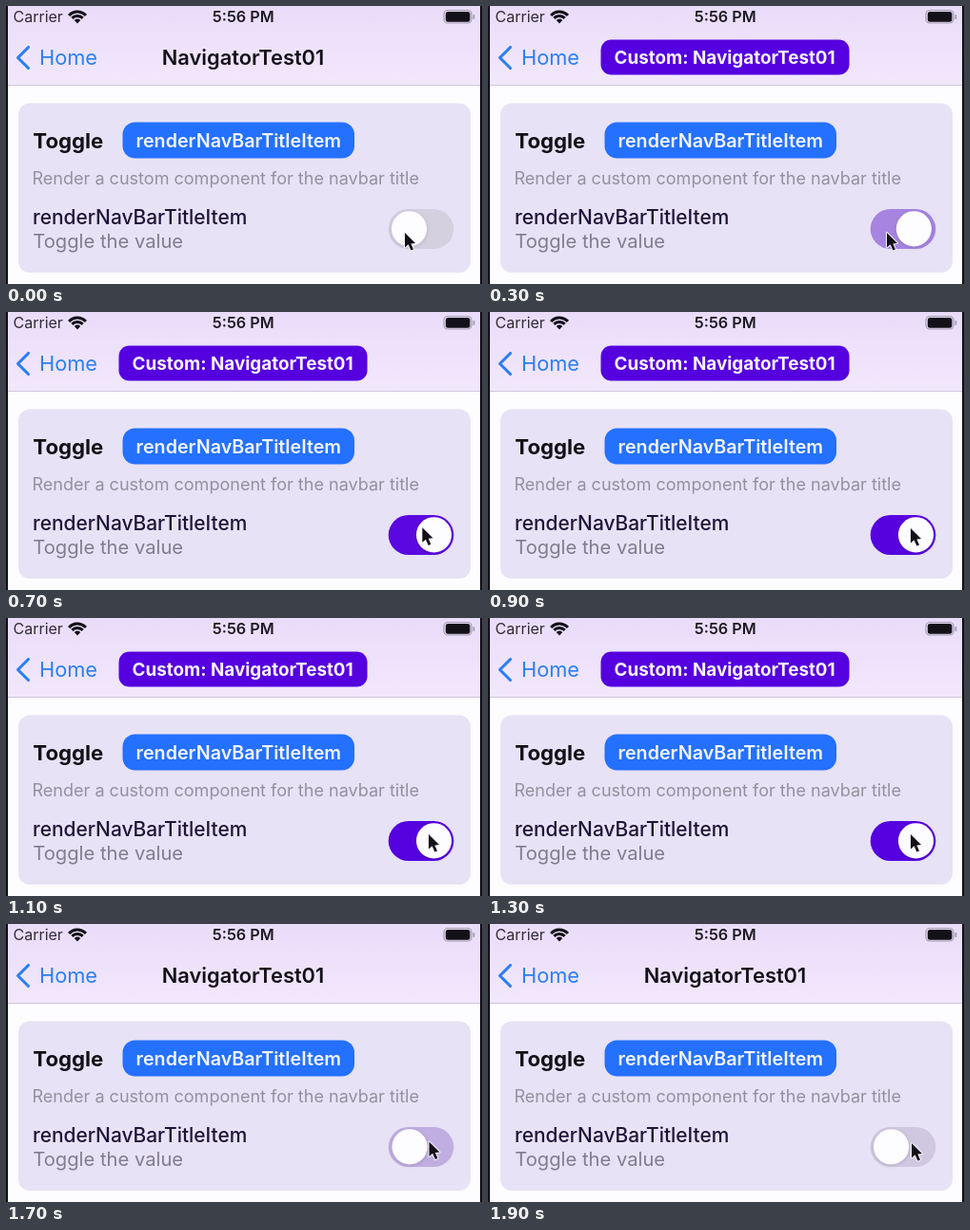
These frames come from a looping animation (500 by 293 pixels, 2000 ms). An HTML page with a canvas:

```html
<!DOCTYPE html>
<html lang="en">
<head>
<meta charset="utf-8">
<title>Navbar title toggle</title>
<style>
html, body { margin: 0; width: 100%; height: 100%; overflow: hidden; background: #fdfcff; }
canvas { display: block; width: 500px; height: 293px; }
</style>
</head>
<body>
<canvas id="stage"></canvas>
<script>
const W = 500, H = 293, LOOP = 2000, STEP = 100;
const INK = '#131018', BLUE = '#2a7ff3', VIOLET = '#5500df';
const canvas = document.getElementById('stage');
const ctx = canvas.getContext('2d');
const ratio = window.devicePixelRatio || 1;
canvas.width = W * ratio;
canvas.height = H * ratio;
ctx.scale(ratio, ratio);

const mix = (a, b, p) => a + (b - a) * p;
const ramp = (t, from, to) => Math.min(1, Math.max(0, (t - from) / (to - from)));
// Fast start, then an exponential approach to 1.
const settle = (t, from, tau) => t < from ? 0 : 1 - Math.exp((from - t) / tau);
// Rises to 1 after `on`, falls back to 0 after `off`.
const pulse = (t, on, off, tau) => settle(t, on, tau) * (1 - settle(t, off, tau));

function box(x, y, w, h, r, color) {
  ctx.fillStyle = color;
  ctx.beginPath();
  ctx.roundRect(x, y, w, h, r);
  ctx.fill();
}

function label(str, x, y, size, weight, color, align = 'left') {
  ctx.font = `${weight} ${size}px Inter, Roboto, sans-serif`;
  ctx.textAlign = align;
  ctx.fillStyle = color;
  ctx.fillText(str, x, y);
}

function polyline(points) {
  ctx.beginPath();
  points.forEach(([x, y]) => ctx.lineTo(x, y));
}

function drawWifi() {
  const mid = -Math.PI / 2, half = 0.83;
  ctx.strokeStyle = ctx.fillStyle = INK;
  ctx.lineWidth = 3;
  ctx.lineCap = 'butt';
  for (const r of [7.6, 12]) {
    ctx.beginPath();
    ctx.arc(75, 18, r, mid - half, mid + half);
    ctx.stroke();
  }
  ctx.beginPath();
  ctx.moveTo(75, 18.5);
  ctx.arc(75, 18, 4.4, mid - half, mid + half);
  ctx.fill();
}

function drawBattery() {
  ctx.strokeStyle = '#a39cae';
  ctx.lineWidth = 1.2;
  ctx.beginPath();
  ctx.roundRect(460, 4.5, 29, 13.5, 4);
  ctx.stroke();
  box(461.8, 5.9, 25.6, 10.8, 2.5, INK);
  box(490.5, 9, 1.8, 5, 1, '#a39cae');
}

function drawHeader(custom) {
  const shade = ctx.createLinearGradient(0, 0, 0, 83);
  shade.addColorStop(0, '#e9dcfa');
  shade.addColorStop(1, '#f2e8fc');
  ctx.fillStyle = shade;
  ctx.fillRect(0, 0, W, 83);
  ctx.fillStyle = '#cfc6da';
  ctx.fillRect(0, 83, W, 1);

  label('Carrier', 7.5, 17, 16, 400, '#302c38');
  drawWifi();
  label('5:56 PM', 249.2, 17, 16.2, 600, '#1c1922', 'center');
  drawBattery();

  ctx.strokeStyle = BLUE;
  ctx.lineWidth = 3.1;
  ctx.lineCap = ctx.lineJoin = 'round';
  polyline([[23.5, 43.5], [12.5, 54.5], [23.5, 65.5]]);
  ctx.stroke();
  label('Home', 35, 62, 21.8, 400, BLUE);

  if (custom) {
    box(118.5, 35.5, 261, 37, 11, VIOLET);
    label('Custom: NavigatorTest01', 248.6, 61, 18.85, 700, '#f8f4ff', 'center');
  } else {
    label('NavigatorTest01', 249, 62, 21.8, 600, INK, 'center');
  }
}

function drawCard() {
  box(13, 102.5, 475, 178.5, 12, '#e7e2f5');
  label('Toggle', 28.3, 150, 22.2, 700, INK);
  box(122.5, 122.5, 243.5, 38, 13, '#2470ff');
  label('renderNavBarTitleItem', 244.3, 149, 19.7, 600, '#f2f6ff', 'center');
  label('Render a custom component for the navbar title', 27.5, 188, 18.05, 400, '#94909f');
  label('renderNavBarTitleItem', 28, 230, 20.9, 500, '#1f1438');
  label('Toggle the value', 28.3, 255, 20.2, 400, '#827d8d');
}

function drawSwitch(t) {
  const tint = pulse(t, 236, 1445, 140);
  const rgb = [mix(213, 85, tint), mix(208, 0, tint), mix(224, 223, tint)].map(Math.round);
  const x = mix(423.5, 449.5, pulse(t, 150, 1465, 60));
  const r = 18.6;
  box(401.7, 214, 68.6, 42, 21, `rgb(${rgb})`);
  ctx.save();
  ctx.shadowColor = 'rgba(40, 20, 80, 0.18)';
  ctx.shadowBlur = 4 * ratio;
  ctx.shadowOffsetY = ratio;
  box(x - r, 234.8 - r, 2 * r, 2 * r, r, '#fdfcff');
  ctx.restore();
}

function drawCursor(t) {
  const lift = ramp(t, 300, 500), slide = ramp(t, 500, 800), drift = ramp(t, 1500, 1900);
  ctx.save();
  ctx.translate(419 + 5 * lift + 20 * slide + drift, 239 - 13 * lift + 2 * slide + 3 * drift);
  polyline([[0, 0], [0, 15.5], [3.6, 12.3], [6.4, 18.6], [9, 17.4], [6.3, 11.4], [11, 11]]);
  ctx.closePath();
  ctx.lineWidth = 2;
  ctx.lineJoin = 'round';
  ctx.strokeStyle = '#f6f3fb';
  ctx.stroke();
  ctx.fillStyle = INK;
  ctx.fill();
  ctx.restore();
}

function draw(now) {
  const t = Math.floor((now % LOOP) / STEP) * STEP;
  ctx.fillStyle = '#fdfcff';
  ctx.fillRect(0, 0, W, H);
  drawHeader(t >= 200 && t < 1500);
  drawCard();
  drawSwitch(t);
  drawCursor(t);
  ctx.fillStyle = INK;
  ctx.fillRect(0, 0, 2, H);
  ctx.fillRect(498, 0, 2, H);
}

const start = performance.now();
function tick() {
  draw(performance.now() - start);
  requestAnimationFrame(tick);
}
tick();
</script>
</body>
</html>
```
